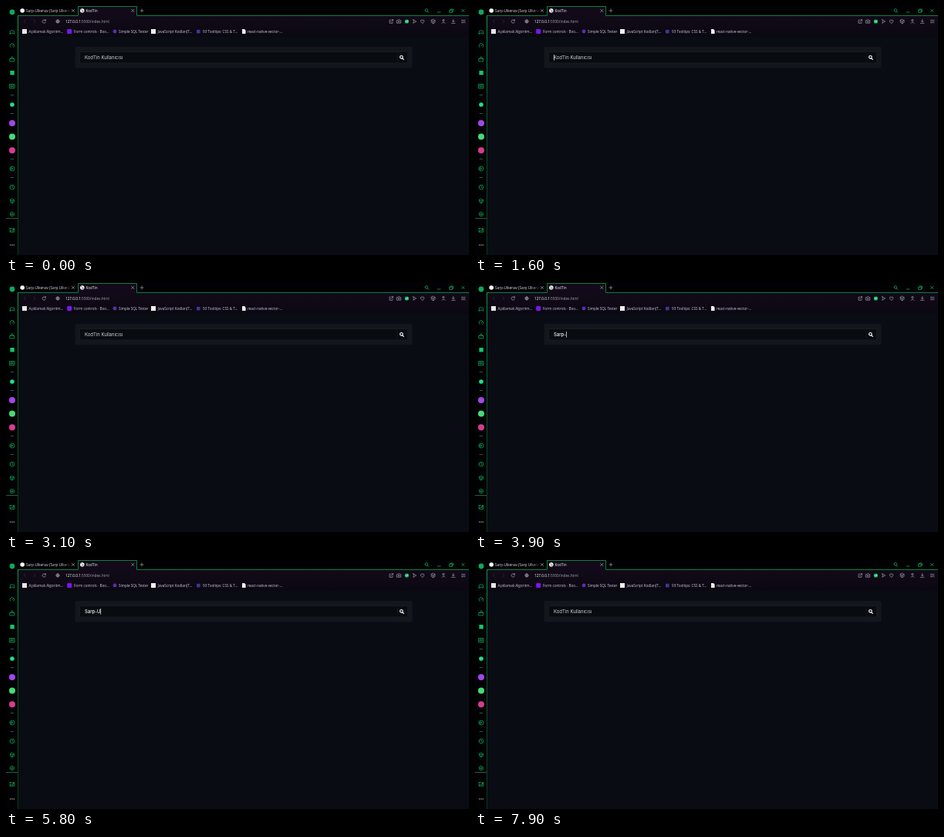
Animation, 600 px wide and 323 px high, one loop 8000 ms. Source, as an HTML page:

```html
<!DOCTYPE html>
<html lang="tr">
<head>
<meta charset="utf-8">
<title>Kullanıcı arama</title>
<style>
  html, body { margin: 0; width: 100%; height: 100%; overflow: hidden; background: #090d13; }
  svg { display: block; width: 600px; height: 323px; }
  text { font-family: "Open Sans", "Noto Sans", sans-serif; font-size: 4.7px; fill: #dedae6; }
  .marks text { font-size: 4.6px; fill: #d3cbe0; }
  .field { font-family: Inter, sans-serif; font-size: 5.95px; fill: #d2d4d8; }
  .typed { fill: #fff; font-weight: 500; }
  .line { fill: none; stroke-width: .65; stroke-linecap: round; stroke-linejoin: round; }
  .frame { stroke: #0b7d42; stroke-width: 1; stroke-linecap: butt; }
  .green { stroke: #12c765; }
  .grey { stroke: #aca6b6; }
</style>
</head>
<body>
<svg viewBox="0 0 600 323">
  <defs>
    <linearGradient id="edge" x2="0" y2="1">
      <stop stop-color="#0e9a50"/><stop offset=".35" stop-color="#0a5a31"/><stop offset="1" stop-color="#08361f"/>
    </linearGradient>
    <linearGradient id="fade" gradientUnits="userSpaceOnUse" x1="72" x2="83">
      <stop stop-color="#dedae6"/><stop offset="1" stop-color="#dedae6" stop-opacity=".2"/>
    </linearGradient>
    <linearGradient id="bar" x2="0" y2="1">
      <stop stop-color="#120a18"/><stop offset="1" stop-color="#0a0812"/>
    </linearGradient>
    <clipPath id="tabClip"><rect x="26" y="0" width="57" height="12"/></clipPath>
    <path id="x" d="M-1.6-1.6 1.6 1.6M1.6-1.6-1.6 1.6"/>
    <path id="cube" d="M0-2.7 2.4-1.35V1.35L0 2.7-2.4 1.35V-1.35ZM-2.4-1.35 0 0 2.4-1.35M0 0V2.7"/>
    <path id="globe" d="M-2.1 0A2.1 2.1 0 1 0 2.1 0 2.1 2.1 0 1 0-2.1 0H2.1M0-2.1Q-2 0 0 2.1 2 0 0-2.1"/>
    <path id="lens" d="M-2.2-.5A1.8 1.8 0 1 0 1.4-.5 1.8 1.8 0 1 0-2.2-.5M.9.9 2.5 2.5"/>
  </defs>

  <!-- window -->
  <rect width="600" height="323" fill="#020204"/>
  <rect x="16" y="13" width="584" height="27" fill="url(#bar)"/>
  <rect x="16" y="40" width="584" height="283" fill="#090d13"/>
  <rect x="94" y="0" width="75" height="13" fill="#120a18"/>
  <rect x="15" y="13" width="1" height="310" fill="url(#edge)"/>
  <path class="line frame" d="M15 12.5H93.5V.5H169.5V12.5H600"/>
  <path class="line" d="M0 275.5H15" stroke="#2a5a40" style="stroke-width:1"/>

  <!-- tabs -->
  <circle cx="21.2" cy="6" r="2.8" fill="#fff"/>
  <text x="26" y="7.8" fill="url(#fade)" style="fill:url(#fade)" clip-path="url(#tabClip)">Sarp-Ulkenav (Sarp Ulkenav)</text>
  <circle cx="98.8" cy="6" r="2.7" fill="#fff"/>
  <path class="line" d="M97.6 4.6 99.3 5.7 98.3 7.4M100.3 6.6 99.7 7.6" stroke="#333"/>
  <text x="103.4" y="7.8" style="fill:#f2f0f5">KodTin</text>
  <g class="line grey">
    <use href="#x" x="87" y="6"/><use href="#x" x="164.3" y="6"/>
    <path d="M173.9 6h4.2M176 3.9v4.2"/>
  </g>
  <g class="line green">
    <use href="#lens" x="545.3" y="6"/>
    <path d="M559.2 8h3.8M575 5.2h3.2v3.2H575ZM576.2 5.2V4h3.2v3.2h-1.2"/>
    <use href="#x" x="592.3" y="6"/>
  </g>

  <!-- address bar -->
  <path class="line" stroke="#37333f" d="M25.2 18 23.2 20l2 2M36 18 38 20 36 22"/>
  <g class="line grey">
    <path d="M51 18.6A2.2 2.2 0 1 0 51.4 20.8M51.4 17.4V19H49.8"/>
    <use href="#globe" x="67" y="20"/>
    <path d="M498.5 18.2H497V22.3H501V21M498.7 20.7 501.4 17.9M499.9 17.7h1.6v1.6"/>
    <path d="M506.7 18.6h1.2l.6-.9h1.4l.6.9h1.2v3.6h-5ZM508.3 20.3a.9.9 0 1 0 1.8 0 .9.9 0 1 0-1.8 0"/>
    <path d="M527.7 17.7 531.7 20 527.7 22.3 528.4 20Z"/>
    <path d="M539.6 22.4 537.5 20.2Q536.9 18.4 538.3 17.9 539.2 17.7 539.6 18.8 540 17.7 540.9 17.9 542.3 18.4 541.7 20.2Z"/>
    <use href="#cube" x="553.6" y="20"/>
    <path d="M565.8 18.6a1.2 1.2 0 1 0 2.4 0 1.2 1.2 0 1 0-2.4 0M564.9 22.4Q567 19.6 569.1 22.4"/>
    <path d="M579.7 17.5v3.3M578.3 19.4l1.4 1.4 1.4-1.4M577.4 22.4h4.6"/>
    <path d="M590.5 18.3h2.2M594 18.3h.8M590.5 20h.6M592.4 20h2.4M590.5 21.7h2.2M594 21.7h.8"/>
  </g>
  <circle cx="519.4" cy="20" r="2.6" fill="#12c765"/>
  <path class="line" stroke="#fff" d="M518.3 20l.9.9 1.5-1.7"/>
  <text x="77" y="21.8"><tspan fill="#fff" style="fill:#fff">127.0.0.1</tspan><tspan style="fill:#a9a4b2">:5500/index.html</tspan></text>

  <!-- bookmarks -->
  <g class="marks">
    <rect x="21" y="30" width="6" height="6" fill="#e8e8e8"/>
    <rect x="79.2" y="30" width="6" height="6" rx="1.3" fill="#7a16f2"/>
    <circle cx="141" cy="33" r="2.4" fill="#5a2fb0"/>
    <rect x="188" y="30" width="6" height="6" fill="#f2f2f2"/>
    <rect x="247" y="30.8" width="4.6" height="4.6" fill="#3f3596"/>
    <path d="M306 30h3l1.6 1.6V36H306Z" fill="#eee"/>
    <text x="29.5" y="34.8">Açıklamalı Algoritm...</text>
    <text x="88" y="34.8">Form controls · Boo...</text>
    <text x="146" y="34.8">Simple SQL Tester</text>
    <text x="196.7" y="34.8">JavaScript Kodları(T...</text>
    <text x="255" y="34.8">93 Tooltips: CSS &amp; T...</text>
    <text x="313" y="34.8">react-native-vector-...</text>
  </g>

  <!-- sidebar -->
  <circle cx="8" cy="8" r="3.4" fill="#12a858"/>
  <g class="line green">
    <path d="M5.2 36 5.5 32.5Q6 31.3 7 32H9Q10 31.3 10.5 32.5L10.8 36Q10 37 9 35H7Q6 37 5.2 36Z"/>
    <path d="M6 53.4A2.8 2.8 0 1 1 10 53.4M8 51.7 9.4 50.2"/>
    <path d="M5.2 68.5H10.8V71.8H5.2ZM5.6 68.3 7 66.9H9L10.4 68.3M8 66.7V65.6"/>
    <path d="M5 101.5H11V106.8H5ZM6.4 103h2v2h-2ZM9.4 103h.4M9.4 105h.4"/>
    <path d="M5 211a3 3 0 1 0 6 0 3 3 0 1 0-6 0M7.2 209.8 9.2 211 7.2 212.2Z"/>
    <path d="M5.1 235a2.9 2.9 0 1 0 5.8 0 2.9 2.9 0 1 0-5.8 0M8 233.3V235l1.1.8"/>
    <use href="#cube" x="8" y="253"/>
    <path d="M8 267.3 10.4 268.7V271.5L8 272.9 5.6 271.5V268.7ZM7 270.1a1 1 0 1 0 2 0 1 1 0 1 0-2 0"/>
    <path d="M5.2 288.5H7.5M9.5 288.5H10.8V293.2H5.2V288.5M5.6 292.8 7.5 290.7 9 292.2M8.8 290a.7.7 0 1 0 1.4 0 .7.7 0 1 0-1.4 0"/>
  </g>
  <path class="line" stroke="#4c7d62" d="M6.2 115.5h3.6M6.2 139.5h3.6M6.2 198.5h3.6M6.2 222.5h3.6"/>
  <rect x="5.4" y="84" width="5.4" height="5.4" fill="#12c765"/>
  <circle cx="8" cy="128" r="2.8" fill="#1fe08a"/>
  <circle cx="8" cy="152" r="4" fill="#a445ea"/>
  <circle cx="8" cy="169.6" r="4" fill="#45db78"/>
  <circle cx="8" cy="187.3" r="4" fill="#d83a90"/>
  <g fill="#c8c8c8"><circle cx="5.8" cy="310" r=".65"/><circle cx="8" cy="310" r=".65"/><circle cx="10.2" cy="310" r=".65"/></g>

  <!-- search form -->
  <rect x="89.5" y="53" width="437" height="27.2" rx="2" fill="#14161e"/>
  <rect x="95.5" y="59.5" width="425" height="14.5" rx="1.4" fill="#080b10" stroke="#20222a" stroke-width=".6"/>
  <path d="M507.2 59.8V73.7" stroke="#1b1d25" stroke-width=".6"/>
  <use href="#lens" class="line" x="512.8" y="66.8" stroke="#fff" style="stroke-width:1.2"/>
  <text id="hint" class="field" x="102" y="69">KodTin Kullanıcısı</text>
  <text id="typed" class="field typed" x="102" y="69"></text>
  <rect id="caret" y="63" width=".7" height="7.6" fill="#fff"/>
</svg>
<script>
  const LOOP = 8000, BLINK = 500, NAME = "Sarp-Ulkenav";
  // [start ms, letters typed]; the field gets focus at the second step
  const steps = [
    [0, 0], [1400, 0],
    [3400, 1], [3500, 2], [3600, 3], [3700, 4], [3900, 5],
    [5800, 6], [6000, 7], [6200, 8], [6400, 9], [6600, 10], [6800, 11], [7000, 12],
    [7400, 0]
  ];
  const [hint, typed, caret] = ["hint", "typed", "caret"].map(id => document.getElementById(id));
  const show = (el, on) => el.setAttribute("visibility", on ? "visible" : "hidden");

  function draw(now) {
    const t = now % LOOP;
    const i = steps.findLastIndex(s => s[0] <= t);
    const [start, count] = steps[i];
    const text = NAME.slice(0, count);
    if (typed.textContent !== text) typed.textContent = text;
    show(hint, !count);
    show(caret, i > 0 && (t - start) % (2 * BLINK) < BLINK);
    caret.setAttribute("x", 102 + (count ? typed.getComputedTextLength() : 0));
  }

  const begin = performance.now();
  function tick() {
    draw(performance.now() - begin);
    requestAnimationFrame(tick);
  }
  tick();
</script>
</body>
</html>
```
